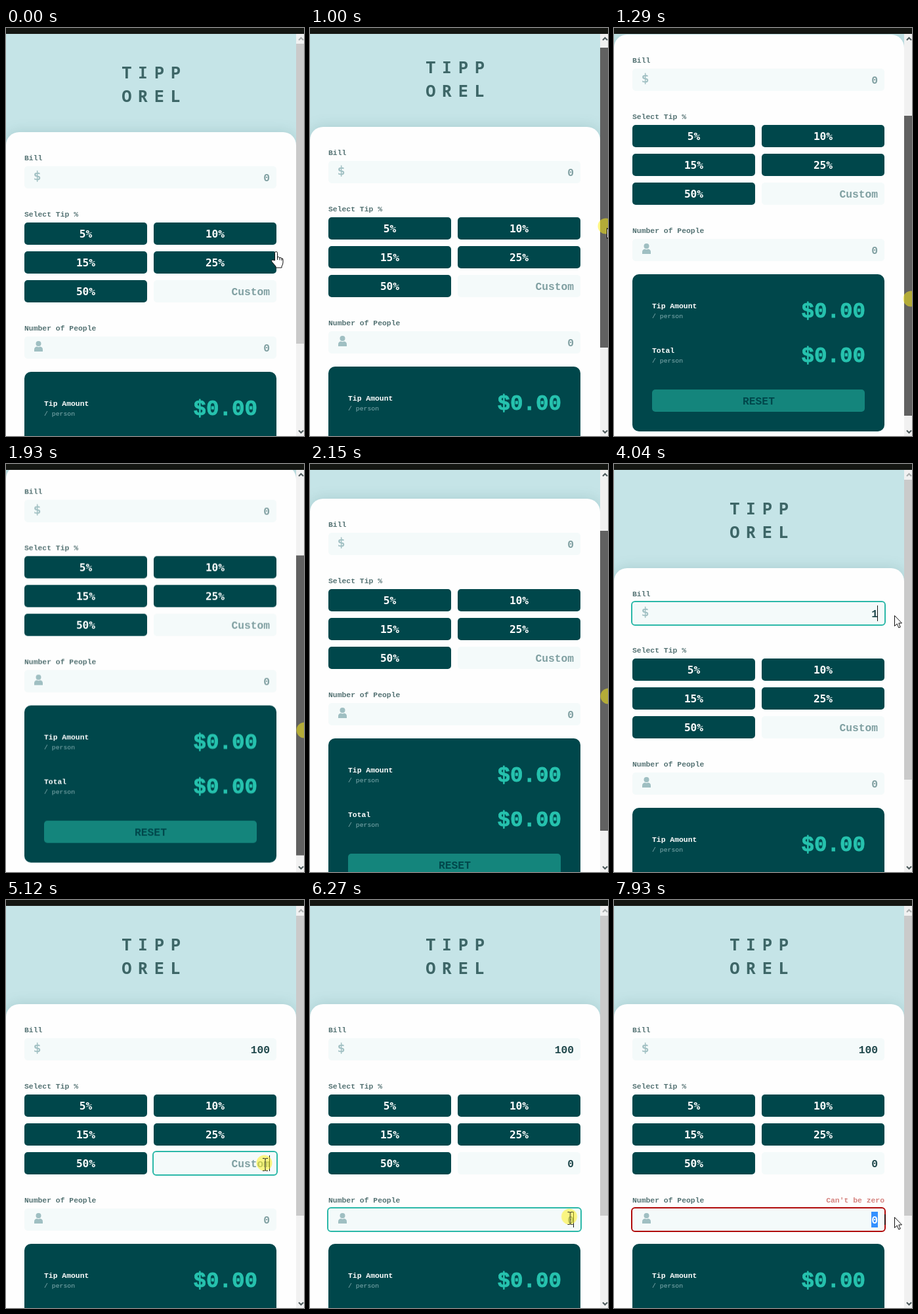
These frames come from a looping animation (454x623 px, 8000 ms). An HTML page:

```html
<!DOCTYPE html>
<html lang="en">
<head>
<meta charset="utf-8">
<title>Tip calculator</title>
<style>
html, body { margin: 0; width: 100%; height: 100%; overflow: hidden; background: #fff; }
svg { display: block; }
text { font: bold 16.3px "Liberation Mono", "DejaVu Sans Mono", monospace; white-space: pre; }

.brand { font: 600 25.5px "Noto Sans Mono", monospace; fill: #3d6667; text-anchor: middle; }
.card { fill: #fefefe; filter: drop-shadow(0 0 10px rgba(0, 71, 75, .15)); }
.label { font-size: 11.4px; fill: #547273; }
.field { fill: #f4fafa; }
.icon { fill: #9fbfc2; }
.sign { font: 18px "DejaVu Sans", sans-serif; stroke: #9fbfc2; stroke-width: .6; }
.dark { fill: #00474b; }
.pick { font: bold 16.2px "DejaVu Sans Mono", monospace; fill: #fff; text-anchor: middle; }
.hint, .value { text-anchor: end; }
.hint { fill: #7f9fa1; }
.value { fill: #1f474b; }
.ring { fill: none; stroke: #2bb8a8; stroke-width: 2; }
.caret { fill: #111; }
.bad { stroke: #b00a0a; }
.warn { font-size: 11.4px; fill: #d5827e; text-anchor: end; }
.name { font-size: 11.4px; fill: #fff; }
.per { font-size: 9.8px; fill: #86b0b3; font-weight: normal; }
.sum { font-size: 32.5px; fill: #26c2ae; stroke: #26c2ae; stroke-width: .8; text-anchor: end; }
.chevron { fill: none; stroke: #4a5759; stroke-width: 2; }
.outline { fill: #fff; stroke: #111; stroke-width: 1; stroke-linejoin: round; }

/* Motion: 1% = 80 ms */
.scroll { animation: scroll 8s step-end infinite; }
#page { --start: -8px; --down: -149px; --end: -169px; --back: -106px; }
#thumb { --start: 6px; --down: 110px; --end: 125px; --back: 78px; }
#cursor { animation: move 8s linear infinite; }
.v { animation: 8s step-end infinite; }

@keyframes scroll {
  0% { transform: translateY(0); }
  12.45% { transform: translateY(var(--start)); animation-timing-function: steps(4); }
  16.1% { transform: translateY(var(--down)); animation-timing-function: steps(4); }
  19.875% { transform: translateY(var(--end)); }
  22.625% { transform: translateY(var(--end)); animation-timing-function: steps(5); }
  26.85% { transform: translateY(var(--back)); animation-timing-function: steps(5); }
  31.25%, 100% { transform: translateY(0); }
}
@keyframes move {
  0%, .875% { transform: translate(411px, 342px); animation-timing-function: ease-in-out; }
  9.875%, 11.75% { transform: translate(452px, 303px); }
  12.45%, 13.3% { transform: translate(452px, 305px); }
  16.1%, 17.1% { transform: translate(454px, 416px); animation-timing-function: ease-out; }
  19.875%, 22.625% { transform: translate(456px, 438px); }
  26.85%, 27.8% { transform: translate(456px, 357px); }
  30.75% { transform: translate(457px, 280px); }
  32.375%, 33.25% { transform: translate(420px, 225px); animation-timing-function: ease-out; }
  36.25%, 39.75% { transform: translate(395px, 235px); }
  42.375%, 56.875% { transform: translate(427px, 231px); }
  58.75% { transform: translate(444px, 290px); }
  61.25%, 64.25% { transform: translate(395px, 404px); animation-timing-function: ease-out; }
  68.5%, 73.125% { transform: translate(400px, 574px); animation-timing-function: ease-in-out; }
  76.875%, 78.75% { transform: translate(396.5px, 486px); }
  81%, 82.875% { transform: translate(443px, 485px); animation-timing-function: ease-in-out; }
  85.625%, 92% { transform: translate(392px, 490px); animation-timing-function: ease-out; }
  95.625% { transform: translate(427px, 483px); animation-timing-function: step-end; }
  99.1%, 100% { transform: translate(427px, 484px); }
}
@keyframes thumb {
  0% { fill: #cacaca; } 9% { fill: #a8a8a8; } 11.75% { fill: #616161; }
  31.25% { fill: #cacaca; } 58.5% { fill: #a8a8a8; } 59.5% { fill: #cacaca; }
}
@keyframes up { 0% { stroke: #a9adad; } 12% { stroke: #4a5759; } 31.25% { stroke: #a9adad; } }

@keyframes hand { 0% { opacity: 1; } 1.75% { opacity: 0; } }
@keyframes arrow {
  0% { opacity: 0; } 1.75% { opacity: 1; }
  34% { opacity: 0; } 40.5% { opacity: 1; }
  60.75% { opacity: 0; } 64.75% { opacity: 1; }
  76% { opacity: 0; } 79.5% { opacity: 1; }
  84.5% { opacity: 0; } 93.5% { opacity: 1; }
}
@keyframes beam {
  0% { opacity: 0; }
  34% { opacity: 1; } 40.5% { opacity: 0; }
  60.75% { opacity: 1; } 64.75% { opacity: 0; }
  76% { opacity: 1; } 79.5% { opacity: 0; }
  84.5% { opacity: 1; } 93.5% { opacity: 0; }
}
@keyframes press {
  0% { opacity: 0; }
  11.75% { opacity: 1; } 31.25% { opacity: 0; }
  36.25% { opacity: 1; } 38.75% { opacity: 0; }
  63.125% { opacity: 1; } 64.25% { opacity: 0; }
  76.9% { opacity: 1; } 78.9% { opacity: 0; }
  88.375% { opacity: 1; } 90.25% { opacity: 0; }
}

@keyframes bill-focus { 0% { opacity: 0; } 38.75% { opacity: 1; } 63.6% { opacity: 0; } }
@keyframes bill-caret {
  0% { opacity: 0; } 38.75% { opacity: 1; } 45.125% { opacity: 0; }
  50.45% { opacity: 1; } 63.6% { opacity: 0; }
}
@keyframes bill-hint { 0% { opacity: 1; } 50.45% { opacity: 0; } }
@keyframes bill-1 { 0% { opacity: 0; } 50.45% { opacity: 1; } 55% { opacity: 0; } }
@keyframes bill-10 { 0% { opacity: 0; } 55% { opacity: 1; } 56.875% { opacity: 0; } }
@keyframes bill-100 { 0% { opacity: 0; } 56.875% { opacity: 1; } }

@keyframes tip-focus { 0% { opacity: 0; } 63.6% { opacity: 1; } 76.9% { opacity: 0; } }
@keyframes tip-hint { 0% { opacity: 1; } 73.125% { opacity: 0; } }
@keyframes tip-value { 0% { opacity: 0; } 73.125% { opacity: 1; } }

@keyframes people-focus { 0% { opacity: 0; } 76.9% { opacity: 1; } 82.875% { opacity: 0; } }
@keyframes people-hint { 0% { opacity: 1; } 80% { opacity: 0; } }
@keyframes people-value { 0% { opacity: 0; } 80% { opacity: 1; } }
@keyframes warn { 0% { opacity: 0; } 82.875% { opacity: 1; } }
@keyframes invalid { 0% { opacity: 0; } 92% { opacity: 1; } }
@keyframes edge { 0% { opacity: 0; } 95.6% { opacity: 1; } }
</style>
</head>
<body>
<svg width="454" height="623" viewBox="0 0 454 623">
  <g id="page" class="scroll">
    <rect y="-10" width="442" height="300" fill="#c5e4e7"/>
    <text class="brand" y="77" x="184 208.5 233.5 258.5">TIPP</text>
    <text class="brand" y="113" x="184 208.5 233.5 258.5">OREL</text>
    <rect class="card" y="159" width="442" height="680" rx="20"/>

    <text class="label" x="28" y="202">Bill</text>
    <rect class="field" x="28" y="211" width="384" height="34" rx="5"/>
    <text class="icon sign" x="42" y="232">$</text>
    <text class="hint v" style="animation-name:bill-hint" x="402" y="234">0</text>
    <text class="value v" style="animation-name:bill-1" x="402" y="234">1</text>
    <text class="value v" style="animation-name:bill-10" x="402" y="234">10</text>
    <text class="value v" style="animation-name:bill-100" x="402" y="234">100</text>
    <rect class="ring v" style="animation-name:bill-focus" x="27" y="210" width="386" height="36" rx="5"/>
    <rect class="caret v" style="animation-name:bill-caret" x="401" y="216" width="1" height="24"/>

    <text class="label" x="28" y="288">Select Tip %</text>
    <g class="dark">
      <rect x="28" y="297" width="187" height="34" rx="5"/>
      <rect x="225" y="297" width="187" height="34" rx="5"/>
      <rect x="28" y="341" width="187" height="34" rx="5"/>
      <rect x="225" y="341" width="187" height="34" rx="5"/>
      <rect x="28" y="385" width="187" height="34" rx="5"/>
    </g>
    <text class="pick" x="121.5" y="320">5%</text>
    <text class="pick" x="318.5" y="320">10%</text>
    <text class="pick" x="121.5" y="364">15%</text>
    <text class="pick" x="318.5" y="364">25%</text>
    <text class="pick" x="121.5" y="408">50%</text>
    <rect class="field" x="225" y="385" width="187" height="34" rx="5"/>
    <text class="hint v" style="animation-name:tip-hint" x="402" y="408">Custom</text>
    <text class="value v" style="animation-name:tip-value" x="402" y="408">0</text>
    <g class="v" style="animation-name:tip-focus">
      <rect class="ring" x="224" y="384" width="189" height="36" rx="5"/>
      <rect class="caret" x="401" y="390" width="1" height="24"/>
    </g>

    <text class="label" x="28" y="462">Number of People</text>
    <text class="warn v" style="animation-name:warn" x="412" y="462">Can't be zero</text>
    <rect class="field" x="28" y="471" width="384" height="34" rx="5"/>
    <g class="icon">
      <circle cx="49.5" cy="482" r="4"/>
      <path d="M43 494v-3q0-4 4-4.5q2.5 1.5 5 0q4 .5 4 4.5v3z"/>
    </g>
    <text class="hint v" style="animation-name:people-hint" x="402" y="494">0</text>
    <text class="value v" style="animation-name:people-value" x="402" y="494">0</text>
    <g class="v" style="animation-name:people-focus">
      <rect class="ring" x="27" y="470" width="386" height="36" rx="5"/>
      <rect class="caret" x="401" y="476" width="1" height="24"/>
    </g>
    <g class="v" style="animation-name:invalid">
      <rect class="ring bad" x="27" y="470" width="386" height="36" rx="5"/>
      <rect x="392" y="476" width="10" height="24" fill="#3390ff"/>
      <text class="value" style="fill:#fff" x="402" y="494">0</text>
    </g>
    <rect class="caret v" style="animation-name:edge" x="412" y="480" width="1.5" height="16"/>

    <rect class="dark" x="28" y="525" width="384" height="240" rx="10"/>
    <text class="name" x="58" y="577">Tip Amount</text>
    <text class="per" x="58" y="592">/ person</text>
    <text class="sum" x="383" y="591">$0.00</text>
    <text class="name" x="58" y="645">Total</text>
    <text class="per" x="58" y="660">/ person</text>
    <text class="sum" x="383" y="659">$0.00</text>
    <rect x="58" y="701" width="324" height="34" rx="5" fill="#14857c"/>
    <text class="dark" x="220.5" y="724" text-anchor="middle">RESET</text>
  </g>

  <rect x="442" y="9" width="12" height="614" fill="#f1f1f1"/>
  <g id="thumb" class="scroll">
    <rect class="v" style="animation-name:thumb" x="442" y="24" width="12" height="458"/>
  </g>
  <path class="chevron v" style="animation-name:up" d="M446 18.5l3.5-3.5 3.5 3.5"/>
  <path class="chevron" d="M446 614.5l3.5 3.5 3.5-3.5"/>

  <g id="cursor">
    <circle class="v" style="animation-name:press" cx="-1.5" cy="-2.5" r="12" fill="#fff014" fill-opacity=".52"/>
    <g class="v" style="animation-name:hand">
      <path class="outline" d="M-1.5 13V1.5Q-1.5 -.5 .5 -.5T2.5 1.5V8Q5 6.500 6 9Q8 7.500 9 10Q11 9 11 12V16Q11 19 9 22V24H0V22L-5.500 15.500Q-7.500 12.500-5 12Z"/>
      <path d="M2.5 8V12M6 9V12.500M9 10V13" fill="none" stroke="#111"/>
    </g>
    <path class="outline v" style="animation-name:arrow" d="M.5 .5V16.500L4.200 13L6.800 19L9.300 18L6.800 12H11.500Z"/>
    <path class="v" style="animation-name:beam" d="M-4-9.500H-1.500Q0-9.500 0-8Q0-9.500 1.500-9.500H4M0-8V8M-4 9.500H-1.500Q0 9.500 0 8Q0 9.500 1.500 9.500H4" fill="none" stroke="#222"/>
  </g>

  <rect width="454" height="9" fill="#141612"/>
</svg>
</body>
</html>
```
